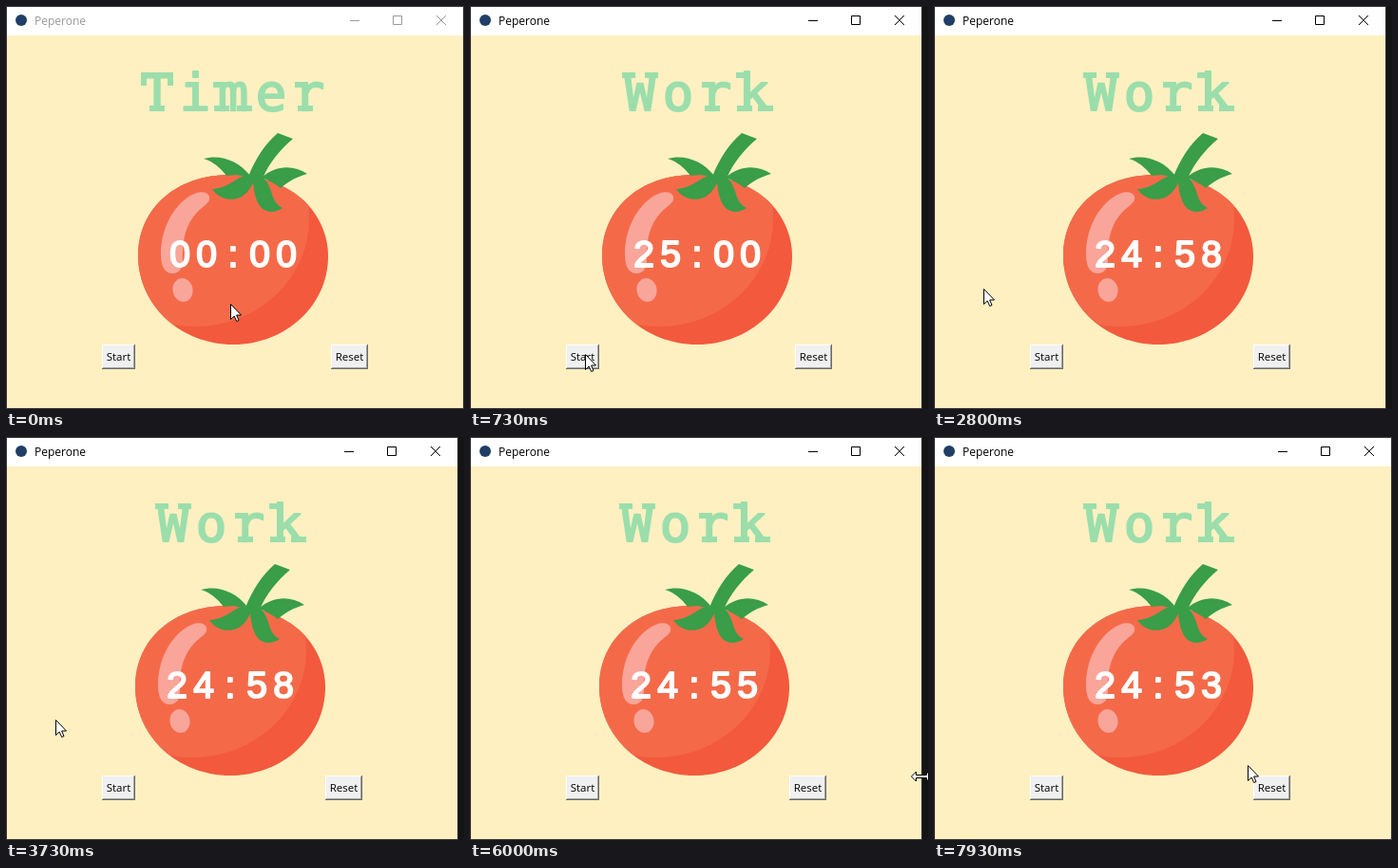
Write an HTML page with a canvas that moves like this. It is 482 by 425 pixels and loops after 8000 ms.

```html
<!DOCTYPE html>
<html lang="en">
<head>
<meta charset="utf-8">
<title>Timer</title>
<style>
  html, body { margin: 0; width: 100%; height: 100%; overflow: hidden; background: #141414; }
  canvas { display: block; }
</style>
</head>
<body>
<canvas id="stage" width="482" height="425"></canvas>
<script>
const ctx = document.getElementById('stage').getContext('2d');
const LOOP = 8000, STEP = 1000 / 15;
const FOCUS = 660, START = 720, RELAYOUT = 790, EDGE = 5190, LEAVE = 7600;
const MINT = '#9bdeac', CREAM = '#fef0c1', LEAF = '#3a9d48';

// Pointer moves; each one begins where the previous one ended.
const HOME = [236, 314];
const moves = [
  { start: 0, end: 470, to: [121, 367], bow: 48 },
  { start: START, end: 1060, to: [52, 298], bow: 0 },
  { start: 4530, end: 4930, to: [490, 362], bow: 0 },
  { start: LEAVE, end: 7930, to: [330, 346], bow: 0 }
];

// Serif centres within a 40 px letter cell.
const feet = { T: [20], m: [8, 32], r: [16], k: [10, 32] };
const tops = { W: [8, 32], m: [6], r: [12], k: [8] };
const drops = { T: [6, 34] };

const progress = (t, start, end) => Math.min(1, Math.max(0, (t - start) / (end - start)));
const ease = p => (1 - Math.cos(Math.PI * p)) / 2;
const windowWidth = t => t < START ? 482 : 476 + 6 * progress(t, 7130, 7330);

function clockText(t) {
  if (t < START) return '00:00';
  const left = 1500 - Math.max(0, Math.floor((t - 750) / 1000));
  return [left / 60, left % 60].map(n => String(Math.floor(n)).padStart(2, '0')).join(':');
}

function pointerPosition(t) {
  let [x, y] = HOME;
  for (const { start, end, to, bow } of moves) {
    const p = ease(progress(t, start, end));
    x += (to[0] - x) * p;
    y += (to[1] - y) * p - bow * Math.sin(Math.PI * p);
  }
  return [x, y].map(Math.round);
}

function rect(color, x, y, w, h) {
  ctx.fillStyle = color;
  ctx.fillRect(x, y, w, h);
}

function shape(color, d) {
  ctx.fillStyle = color;
  ctx.fill(new Path2D(d));
}

function ellipse(color, x, y, rx, ry, tilt = 0) {
  ctx.fillStyle = color;
  ctx.beginPath();
  ctx.ellipse(x, y, rx, ry, tilt, 0, 2 * Math.PI);
  ctx.fill();
}

function text(str, x, y, font, color, align = 'left') {
  ctx.font = font;
  ctx.fillStyle = color;
  ctx.textAlign = align;
  ctx.fillText(str, x, y);
}

// Evenly spaced letters, thickened by a thin outline.
function spaced(str, cx, y, pitch, font, color) {
  ctx.strokeStyle = color;
  ctx.lineWidth = 2;
  ctx.lineJoin = 'round';
  [...str].forEach((ch, i) => {
    const x = cx + (i - (str.length - 1) / 2) * pitch;
    text(ch, x, y, font, color, 'center');
    ctx.strokeText(ch, x, y);
  });
}

function heading(str, cx) {
  const base = 111;
  spaced(str, cx, base - 1, 40, '54px "DejaVu Sans Mono", monospace', MINT);
  [...str].forEach((ch, i) => {
    const left = cx + (i - str.length / 2) * 40;
    const top = base - ('mr'.includes(ch) ? 31 : 41);
    for (const x of feet[ch] || []) rect(MINT, left + x - 8, base - 6, 16, 6);
    for (const x of tops[ch] || []) rect(MINT, left + x - 7, top, 14, 6);
    for (const x of drops[ch] || []) rect(MINT, left + x - 3, top, 6, 14);
  });
}

function windowFrame(w, active) {
  rect('#141414', 0, 0, 482, 425);
  rect('#3a3a3a', 0, 0, w, 425);
  rect('#fff', 1, 1, w - 2, 30);
  rect(CREAM, 1, 31, w - 2, 393);

  const ink = active ? '#000' : '#999';
  ellipse('#1f3f66', 16, 15, 6, 6);
  text('Peperone', 30, 20, '12px "Open Sans", sans-serif', ink);

  ctx.strokeStyle = ink;
  ctx.lineWidth = 1;
  rect(ink, w - 120, 15, 10, 1);
  ctx.strokeRect(w - 74.5, 10.5, 9, 9);
  ctx.beginPath();
  ctx.moveTo(w - 29, 10);
  ctx.lineTo(w - 19, 20);
  ctx.moveTo(w - 19, 10);
  ctx.lineTo(w - 29, 20);
  ctx.stroke();
}

function tomato() {
  const body = 'M136 263C136 212 178 178 232 178C262 178 288 186 308 203' +
    'C327 220 336 242 336 264C336 316 291 357 236 357C181 357 136 316 136 263Z';
  shape('#f3593d', body);
  ctx.save();
  ctx.clip(new Path2D(body));
  ellipse('#f46a49', 196, 225, 120, 113);
  ctx.restore();

  shape('#f9a59a', 'M211 201C209 195 199 194 188 202C170 215 160 238 160 262' +
    'C160 276 165 282 172 282C179 282 183 277 183 268C182 240 190 224 203 213C209 208 212 206 211 201Z');
  ellipse('#f9a59a', 183, 299.5, 10.5, 12.5, -0.15);

  shape(LEAF, 'M283 134L299 140C286 151 274 165 267 182L252 180C259 162 269 146 283 134Z');
  shape(LEAF, 'M205 161C222 156 242 163 254 179L252 182C243 177 236 178 229 179C222 170 215 164 205 161Z');
  shape(LEAF, 'M314 177C299 167 280 168 266 181C274 184 281 188 286 192C294 185 303 180 314 177Z');
  shape(LEAF, 'M254 178C240 178 234 192 214 193C222 205 236 206 245 201C253 196 256 189 260 180Z');
  shape(LEAF, 'M257 180C257 197 261 209 267 214C274 219 283 217 288 213C274 206 280 193 267 180Z');
}

function button(label, x, w, pressed) {
  const y = 357, h = 26, push = pressed ? 1 : 0;
  const [light, dark, soft] = pressed ? ['#696969', '#fff', '#e3e3e3'] : ['#fff', '#696969', '#a0a0a0'];
  rect(dark, x, y, w, h);
  rect(light, x, y, w - 1, h - 1);
  rect(soft, x + 1, y + 1, w - 2, h - 2);
  rect('#f0f0f0', x + 1, y + 1, w - 3, h - 3);
  text(label, x + w / 2 + push, 374 + push, '11.5px "Open Sans", sans-serif', '#000', 'center');
}

function pointer(x, y, d) {
  const path = new Path2D(d);
  ctx.save();
  ctx.translate(x, y);
  ctx.lineWidth = 1;
  ctx.fillStyle = '#fff';
  ctx.strokeStyle = '#000';
  ctx.fill(path);
  ctx.stroke(path);
  ctx.restore();
}

function draw(t) {
  const w = windowWidth(t);
  const shift = t < RELAYOUT ? 0 : -3;
  const cx = 239 + shift;
  windowFrame(Math.round(w), t >= FOCUS);
  heading(t < START ? 'Timer' : 'Work', cx);

  ctx.save();
  ctx.translate(cx - 236, 0);
  tomato();
  ctx.restore();

  spaced(clockText(t), cx, 275, 28, '39px "Liberation Sans", sans-serif', '#fff');
  button('Start', 101, 35, t >= FOCUS && t < START);
  button('Reset', 342 + shift * 2, 39, false);

  if (t >= EDGE && t < LEAVE) {
    pointer(w - 1, 358, 'M-10.5 0L-5.5 -5V-1.5H5.5V-5L10.5 0L5.5 5V1.5H-5.5V5Z');
  } else {
    pointer(...pointerPosition(t), 'M.5 .5V16.5L4.2 13L6.7 18.5L9 17.5L6.6 12H11.5Z');
  }
}

const began = performance.now();
function tick() {
  const t = (performance.now() - began) % LOOP;
  draw(Math.floor((t + 4) / STEP) * STEP);
  requestAnimationFrame(tick);
}
tick();
</script>
</body>
</html>
```
